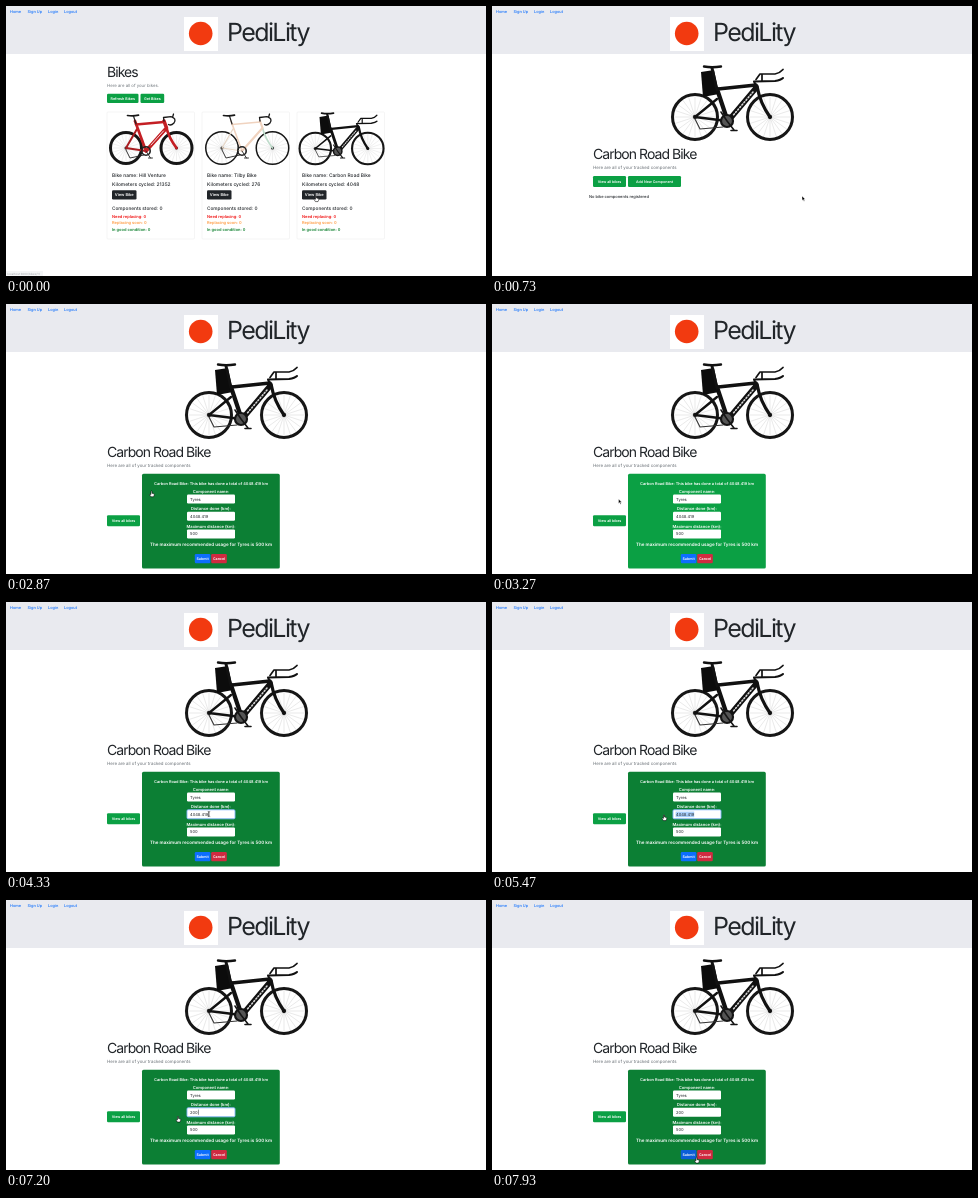
An HTML page for the animation above (8000 ms loop, 480 by 270 pixels).

```html
<!DOCTYPE html>
<html lang="en">
<head>
<meta charset="utf-8">
<title>Bike components</title>
<style>
html, body { margin: 0; width: 100%; height: 100%; overflow: hidden; background: #fff; }
svg { display: block; width: 480px; height: 270px; }
text { font-family: Inter, Roboto, "Liberation Sans", sans-serif; text-rendering: geometricPrecision; white-space: pre; }
</style>
</head>
<body>
<svg id="stage" viewBox="0 0 480 270" xmlns="http://www.w3.org/2000/svg"></svg>
<script>
const LOOP = 8000;
const INK = '#212529', GREEN = '#0ba044', BLUE = '#0d6efd', RED = '#d02a40';

const text = (x, y, str, size, fill = INK, more = '') =>
  `<text x="${x}" y="${y}" font-size="${size}" fill="${fill}" ${more}>${str}</text>`;
const rect = (x, y, w, h, fill, more = '') =>
  `<rect x="${x}" y="${y}" width="${w}" height="${h}" fill="${fill}" ${more}/>`;
const line = (d, color, width, more = '') =>
  `<path d="${d}" fill="none" stroke="${color}" stroke-width="${width}" stroke-linecap="round" stroke-linejoin="round" ${more}/>`;
const group = (id, body) => `<g id="${id}">${body}</g>`;
const MID = 'text-anchor="middle"';
const MEDIUM = 'font-weight="500"';
const BOLD = 'font-weight="600"';

function button(x, y, w, h, label, fill, size = 3.7, id = '') {
  return rect(x, y, w, h, fill, `rx="1.2" ${id && `id="${id}"`}`) +
    text(x + w / 2, y + h / 2 + size * 0.36, label, size, '#fff', `${MID} ${BOLD}`);
}

const heading = (y, str) =>
  text(101, y, str, 14, INK, 'font-weight="400" letter-spacing="-.95"');

function wheel(cx, cy, r, rim) {
  let spokes = '';
  for (let i = 0; i < 20; i++) {
    const a = i * Math.PI / 10;
    spokes += `M${cx} ${cy}l${(r * Math.cos(a)).toFixed(2)} ${(r * Math.sin(a)).toFixed(2)}`;
  }
  return line(spokes, '#999', r * 0.009) +
    `<circle cx="${cx}" cy="${cy}" r="${r - rim / 2}" fill="none" stroke="#161616" stroke-width="${rim}"/>` +
    `<circle cx="${cx}" cy="${cy}" r="${r * 0.09}" fill="#222"/>`;
}

function roadBike(x, y, main, fork, rear, rim, tube) {
  return `<g transform="translate(${x} ${y})">` +
    wheel(18, 36, 17, rim) + wheel(68.5, 36, 17, rim) +
    line('M29 17L18 36L38 39', rear, tube * 0.55) +
    line('M58.5 16Q61 26 68.5 36', fork, tube * 0.75) +
    line('M28 12.5L56 10', main, tube * 0.7) +
    line('M27 9L38 39', main, tube * 0.75) +
    line('M56 9L58.5 16L38 39', main, tube) +
    line('M25.5 4L28 12', '#222', 1.2) +
    line('M19.5 3.5Q25 4.5 30.5 3.2', '#181818', 1.7) +
    line('M56 9L55.5 5.5L63 4.6Q69 6.5 66 11Q63 14 60.5 12.5M64.5 5.5L65.5 2', '#181818', 1.3) +
    '<circle cx="38" cy="39" r="4.2" fill="none" stroke="#222" stroke-width="1.6"/>' +
    line('M38 39L42.5 46M40.5 46h4M18 38L22 46L36 43', '#222', 0.9) + '</g>';
}

function aeroBike() {
  return wheel(203, 111, 24, 3) + wheel(278, 111, 24, 3) +
    line('M225 93L203 111L235 115', '#111', 2.3) +
    line('M265 80Q268 97 278 111', '#111', 3.2) +
    line('M226 83L264 79', '#111', 3.4) +
    line('M225 83L235 113', '#111', 4.2) +
    line('M264 82L237 114', '#111', 5.6) +
    line('M261 86L241 109.5', '#d6d6d6', 1.6, 'stroke-dasharray="1.1 2.1"') +
    '<path d="M209 66L222 64L227 88L211 91Z" fill="#0c0c0c"/>' +
    line('M220 62L225 84', '#111', 3) +
    line('M212 60.5Q220 62 229 60.5', '#111', 2.4) +
    line('M264 80L262 75.5L283 75Q289 74 291 72', '#111', 2) +
    line('M264 73.5L268 68H283Q288 67 291 63.5M270 68V75', '#111', 1.7) +
    '<circle cx="235" cy="115" r="6" fill="#555" stroke="#151515" stroke-width="2.2"/>' +
    line('M235 115L242 124M239 124.5h6M235 115L229 106', '#151515', 1.6) +
    line('M203 113L208 123L231 121', '#333', 1.1);
}

function card(x, name, km) {
  const l = x + 5;
  return rect(x, 106, 87.5, 127, 'none', 'stroke="#efefef" stroke-width=".6" rx="1"') +
    text(l, 171.3, 'Bike name: ' + name, 4.9, INK, MEDIUM) +
    text(l, 180.3, 'Kilometers cycled: ' + km, 4.9, INK, MEDIUM) +
    button(l, 184.3, 24.5, 9.2, 'View Bike', INK, 4) +
    text(l, 204.2, 'Components stored: 0', 4.75, INK, MEDIUM) +
    text(l, 211.7, 'Need replacing: 0', 4, '#f01010', BOLD) +
    text(l, 218.4, 'Replacing soon: 0', 4, '#ff9a40', BOLD) +
    text(l, 224.9, 'In good condition: 0', 4, '#108030', BOLD);
}

const field = (y, id, value) =>
  rect(181, y, 48, 9, '#fff', `rx="1.2" id="${id}Box"`) +
  (id === 'dist' ? rect(183.6, y + 1.8, 18.6, 5.6, '#a9cffb', 'id="mark"') : '') +
  text(184, y + 6, value, 4.1, INK, `id="${id}"`);

const label = (y, str, size = 4.1) => text(205, y, str, size, '#fff', `${MID} ${BOLD}`);

const header = rect(0, 0, 480, 48, '#e9eaef') +
  [[4, 'Home'], [21.5, 'Sign Up'], [42, 'Login'], [58, 'Logout']]
    .map(([x, s]) => text(x, 7.4, s, 3.9, BLUE, MEDIUM)).join('') +
  rect(178, 11, 34, 34, '#fff') +
  '<circle cx="194.7" cy="27.5" r="11.8" fill="#f23a10"/>' +
  text(221, 35.2, 'PediLity', 25, INK, 'font-weight="400" letter-spacing="-1.6"');

const listPage = heading(70.6, 'Bikes') +
  text(101, 81.4, 'Here are all of your bikes.', 4.3, '#70777d') +
  button(101, 87.7, 31.5, 9.3, 'Refresh Bikes', GREEN) +
  button(134.5, 87.7, 23.7, 9.3, 'Get Bikes', GREEN) +
  card(101, 'Hill Venture', 21352) + card(196, 'Tilby Bike', 276) + card(291, 'Carbon Road Bike', 4048) +
  roadBike(102, 106, '#c41f24', '#c41f24', '#a81c20', 3, 3.6) +
  line('M157.5 125L145 139', '#f0d8d8', 1) +
  roadBike(198, 106, '#f0d3bf', '#bfdccb', '#e6d6c6', 1.5, 2.2) +
  `<g transform="translate(167.2 64.8) scale(.7)">${aeroBike()}</g>` +
  group('status', rect(0, 265, 37, 5, '#f4f5f6') + text(1.5, 268.8, 'localhost:3000/bikes/11', 2.9, '#9fa3a7'));

const bikePage = aeroBike() + heading(152.8, 'Carbon Road Bike') +
  text(101, 163.3, 'Here are all of your tracked components', 4.4, '#666d73') +
  group('viewAll', button(101, 170, 33, 11, 'View all bikes', GREEN, 3.6)) +
  group('closed', button(136, 170, 53, 11, 'Add New Component', GREEN, 3.6, 'add') +
    text(97, 192.4, 'No bike components registered', 4, INK, MEDIUM)) +
  group('form', rect(136, 169.8, 137.8, 94.7, GREEN, 'rx="1.6" id="panel"') +
    label(181.4, 'Carbon Road Bike: This bike has done a total of 4048.419 km', 3.9) +
    label(188.9, 'Component name:') + field(190.5, 'part', 'Tyres') +
    label(206.4, 'Distance done (km):') + field(207.8, 'dist', '4048.419') +
    label(223.5, 'Maximum distance (km):') + field(225.4, 'max', '500') +
    label(241.6, 'The maximum recommended usage for Tyres is 500 km', 4.55) +
    button(188.8, 250, 15.6, 9.2, 'Submit', BLUE, 3.6, 'submit') +
    button(205.2, 250, 15.6, 9.2, 'Cancel', RED, 3.6) +
    rect(0, 209.6, 0.5, 5.2, INK, 'id="caret"'));

// Cursor shapes have their hot spot at 0,0.
const cursor = group('cursor',
  group('arrow', '<path d="M0 0V4.6L1.1 3.6L1.9 5.3L2.7 4.9L1.9 3.3H3.3Z" fill="#000" stroke="#fff" stroke-width=".45"/>') +
  group('hand', '<path d="M-.5 0Q0-.5.5 0V2L2.6 2.6Q3 3 2.6 4.3L2 5.6H-.6L-2 3.4Q-1.7 2.7-.5 3.3Z" fill="#fff" stroke="#000" stroke-width=".55"/>') +
  group('beam', line('M-.9-2.6Q0-2.6 0-2V2Q0 2.6-.9 2.6M.9-2.6Q0-2.6 0-2M.9 2.6Q0 2.6 0 2', '#222', 0.45)));

document.getElementById('stage').innerHTML = rect(0, 0, 480, 270, '#fff') + header +
  group('list', listPage) + group('bike', bikePage) + cursor;

const el = {};
document.querySelectorAll('[id]').forEach(e => { el[e.id] = e; });
const show = (id, on) => { el[id].style.display = on ? '' : 'none'; };
const fill = (id, color) => el[id].setAttribute('fill', color);

const PATH = [
  [0, 310, 190], [930, 310, 190], [1700, 170.5, 177], [2500, 170.5, 177], [3180, 126.5, 195],
  [3300, 126.5, 195], [3980, 203, 212], [4450, 203, 212], [5000, 176, 213], [5300, 172, 213],
  [7000, 172, 213.5], [7200, 172, 216.5], [7780, 204.5, 257.5], [LOOP, 204.5, 257.5]
];
const SHAPES = [[0, 'hand'], [400, 'arrow'], [1560, 'hand'], [2900, 'arrow'], [3450, 'hand'],
  [3750, 'beam'], [4860, 'hand']];
const VALUES = [[0, '4048.419'], [5930, '2'], [6080, '20'], [6270, '200']];
const SHADES = [[0, 0], [1560, 1], [2900, 0], [3450, 1]];

const at = (steps, t) => steps.filter(s => s[0] <= t).pop()[1];

function place(t) {
  let i = 0;
  while (i < PATH.length - 2 && PATH[i + 1][0] <= t) i++;
  const [t0, x0, y0] = PATH[i], [t1, x1, y1] = PATH[i + 1];
  const p = Math.min(1, (t - t0) / (t1 - t0)), e = p * p * (3 - 2 * p);
  return [x0 + (x1 - x0) * e, y0 + (y1 - y0) * e];
}

// Hover colour, faded over 150 ms.
function shade(t) {
  const [start, goal] = SHADES.filter(s => s[0] <= t).pop();
  const p = start ? Math.min(1, (t - start) / 150) : 1;
  const k = goal ? p : start ? 1 - p : 0;
  const mix = (a, b) => Math.round(a + (b - a) * k);
  return `rgb(${mix(11, 12)},${mix(160, 127)},${mix(68, 52)})`;
}

function draw(t) {
  const open = t >= 2400, focus = t >= 4000 && t < 7860;
  show('list', t < 400);
  show('status', t < 130);
  show('bike', t >= 400);
  show('closed', !open);
  show('form', open);
  el.viewAll.setAttribute('transform', `translate(0 ${open ? 41.2 : 0})`);
  fill('add', shade(t));
  fill('panel', shade(t));
  fill('submit', t >= 7720 ? '#0b5ed7' : BLUE);

  const value = at(VALUES, t);
  el.dist.textContent = value;
  el.distBox.setAttribute('stroke', focus ? '#86b7fe' : 'none');
  el.distBox.setAttribute('stroke-width', 0.9);

  const [x, y] = place(t);
  const left = Math.max(183.6, Math.min(202.2, x));
  const picked = t >= 4450 && t < 5930;
  show('mark', picked);
  el.mark.setAttribute('x', left);
  el.mark.setAttribute('width', 202.2 - left);

  const base = t < 6100 ? 4000 : 6100;
  const typing = t >= 5930 && t < 6400;
  show('caret', focus && !picked && (typing || (t - base) % 1060 < 530));
  el.caret.setAttribute('x', 184.3 + el.dist.getComputedTextLength());

  const shape = at(SHAPES, t);
  ['arrow', 'hand', 'beam'].forEach(s => show(s, s === shape));
  el.cursor.setAttribute('transform', `translate(${x} ${y})`);
}

const start = performance.now();
function tick() {
  draw((performance.now() - start) % LOOP);
  requestAnimationFrame(tick);
}
tick();
</script>
</body>
</html>
```
